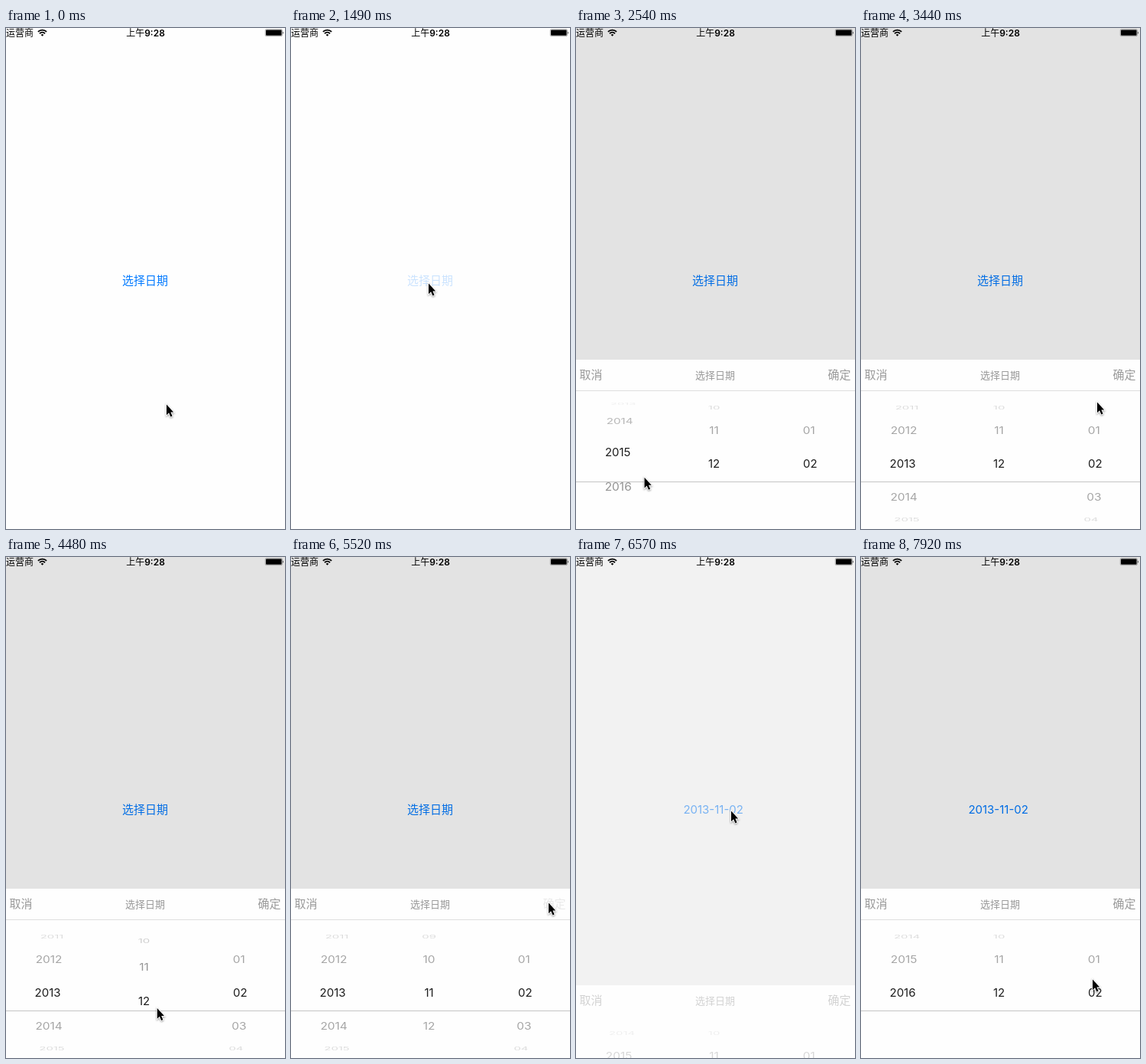
Write an HTML page that moves like this. It is 365 by 654 pixels and loops after 8 s.

```html
<!DOCTYPE html>
<html lang="zh-CN">
<head>
<meta charset="utf-8">
<title>选择日期</title>
<style>
  html, body { margin: 0; width: 100%; height: 100%; overflow: hidden; background: #fefefe; }
  svg { display: block; width: 365px; height: 654px; }
  text { font: 15px Inter, "Noto Sans CJK SC", "Noto Sans CJK", sans-serif; }
  .status { font-size: 12px; }
  .bar { fill: #999; }
  #cursor { filter: drop-shadow(0 1px 1px rgba(0, 0, 0, .4)); }
</style>
</head>
<body>
<svg viewBox="0 0 365 654">
  <rect width="365" height="654" fill="#fefefe"/>
  <text id="label" y="335" text-anchor="middle" fill="#007aff">选择日期</text>
  <rect id="dim" width="365" height="654"/>

  <text class="status" x="0" y="10.5">运营商</text>
  <g fill="none" stroke="#000" stroke-width="1.9">
    <path d="M41.9 4.9a8 8 0 0 1 11.2 0M44 7.2a5 5 0 0 1 7 0"/>
    <path d="M47.5 10.8L45.7 8.9a2.6 2.6 0 0 1 3.6 0Z" fill="#000" stroke="none"/>
  </g>
  <text class="status" x="182.5" y="10.5" text-anchor="middle" style="font-weight:600"><tspan font-weight="500">上午</tspan>9:28</text>
  <rect x="339.2" y="1.8" width="22.2" height="8.8" rx="1.4" fill="none" stroke="#777" stroke-width=".6"/>
  <rect x="340" y="2.6" width="20.6" height="7.2" rx=".8"/>
  <path d="M362.2 4.6q1.6 1.7 0 3.4z"/>

  <g id="panel">
    <rect width="365" height="221" fill="#fefefe"/>
    <g id="content">
      <text class="bar" x="4.5" y="25.3">取消</text>
      <text class="bar" x="182" y="24.6" text-anchor="middle" style="font-size:13px">选择日期</text>
      <text id="confirm" class="bar" x="329.5" y="25.3">确定</text>
      <g id="wheels" text-anchor="middle"></g>
      <g id="restLines">
        <rect y="40" width="365" height="1" fill="#dedede"/>
        <rect y="159" width="365" height="1" fill="#c4c4c4"/>
      </g>
      <rect id="slideLine" y="111" width="365" height="1" fill="#c8c8c8"/>
    </g>
  </g>

  <path id="cursor" d="M0 .6V14.2L3.1 11.3L5.4 16.4L7.6 15.5L5.4 10.5H9.2Z"
        stroke="#fff" stroke-width="1.8" paint-order="stroke"/>
</svg>
<script>
const LOOP = 8000, STEP = 149.4, LAST_STEP = 53;
const $ = id => document.getElementById(id);

const ramp = (t, from, to) => Math.min(1, Math.max(0, (t - from) / (to - from)));
const easeOut = u => 1 - (1 - u) ** 2;
const easeInOut = u => (1 - Math.cos(Math.PI * u)) / 2;

// A slide lasts one step; a pressed button dims at once and fades back.
const slide = (t, from) => easeOut(ramp(t, from, from + 1));
const pressed = (t, down, up) => t < down ? 1 : .2 + .8 * ramp(t, up, up + 1);

const moves = [
  { from: 0, to: 5, x: 144, y: 372 },
  { from: 5, to: 9, x: 180, y: 333 },
  { from: 13, to: 18, x: 80, y: 613 },
  { from: 20, to: 23, x: 309, y: 488 },
  { from: 23, to: 25, x: 338, y: 451 },
  { from: 26, to: 31, x: 183, y: 603 },
  { from: 31, to: 35, x: 337, y: 451 },
  { from: 38, to: 43, x: 203, y: 331 },
  { from: 45, to: 50, x: 178, y: 562 },
  { from: 50, to: 53, x: 303, y: 551 }
];

function cursorAt(t) {
  let x = 210, y = 491;
  for (const move of moves) {
    const u = easeInOut(ramp(t, move.from, move.to));
    x += (move.x - x) * u;
    y += (move.y - y) * u;
  }
  return [x, y];
}

const MIDDLE = 182, CENTER_Y = 135.6, RADIUS = 80, ROW_ANGLE = 33 * Math.PI / 180;

function makeWheel(x) {
  const rows = Array.from({ length: 7 }, () => {
    const row = document.createElementNS("http://www.w3.org/2000/svg", "text");
    row.setAttribute("y", 5.4);
    $("wheels").append(row);
    return row;
  });
  return (position, max) => rows.forEach((row, i) => {
    const value = Math.round(position) + i - 3;
    const offset = value - position, angle = offset * ROW_ANGLE;
    const visible = value >= 1 && value <= max && Math.abs(angle) < 1.45;
    row.textContent = visible ? String(value).padStart(2, "0") : "";
    if (!visible) return;
    const depth = 1 / (1 + .076 * (1 - Math.cos(angle)));
    const far = Math.abs(offset) >= .5;
    const px = MIDDLE + (x - MIDDLE) * depth;
    const py = CENTER_Y + RADIUS * Math.sin(angle);
    const wide = far ? 1.04 * depth : 1;
    row.setAttribute("transform", `translate(${px} ${py}) scale(${wide} ${Math.cos(angle)})`);
    const grey = far ? 165 + 55 * (Math.abs(offset) - 1) : 30;
    row.setAttribute("fill", `rgb(${grey},${grey},${grey})`);
  });
}

const years = makeWheel(54.5), months = makeWheel(180.5), days = makeWheel(306.3);

function draw(t) {
  const [x, y] = cursorAt(t);
  $("cursor").setAttribute("transform", `translate(${x} ${y})`);

  const shown = slide(t, 11.26) - slide(t, 38.78) + slide(t, 43.755);
  $("panel").setAttribute("transform", `translate(0 ${Math.round(654 - 221 * shown)})`);
  $("content").setAttribute("opacity", shown);
  $("dim").setAttribute("opacity", .106 * shown);
  $("restLines").setAttribute("opacity", shown === 1 ? 1 : 0);
  $("slideLine").setAttribute("opacity", shown < 1 ? 1 : 0);

  const chosen = t >= 39;
  $("label").textContent = chosen ? "2013-11-02" : "选择日期";
  $("label").setAttribute("x", chosen ? 179.7 : 182);
  $("label").setAttribute("opacity", pressed(t, 10, 11.35) * pressed(t, 43, 43.625));
  $("confirm").setAttribute("opacity", pressed(t, 37, 37.5));

  // The second picker opens on the latest date again.
  const reopened = t >= 40;
  years(reopened ? 2016 : 2016 - 2 * ramp(t, 16, 19) - easeOut(ramp(t, 20, 22)), 2016);
  months(reopened ? 12 : 12 - easeInOut(ramp(t, 29, 32)), 12);
  days(2, t >= 22 && !reopened ? 31 : 2);
}

const start = performance.now();
function tick() {
  const time = (performance.now() - start) % LOOP;
  draw(Math.min(LAST_STEP, Math.floor((time + 10) / STEP)));
  requestAnimationFrame(tick);
}
tick();
</script>
</body>
</html>
```
